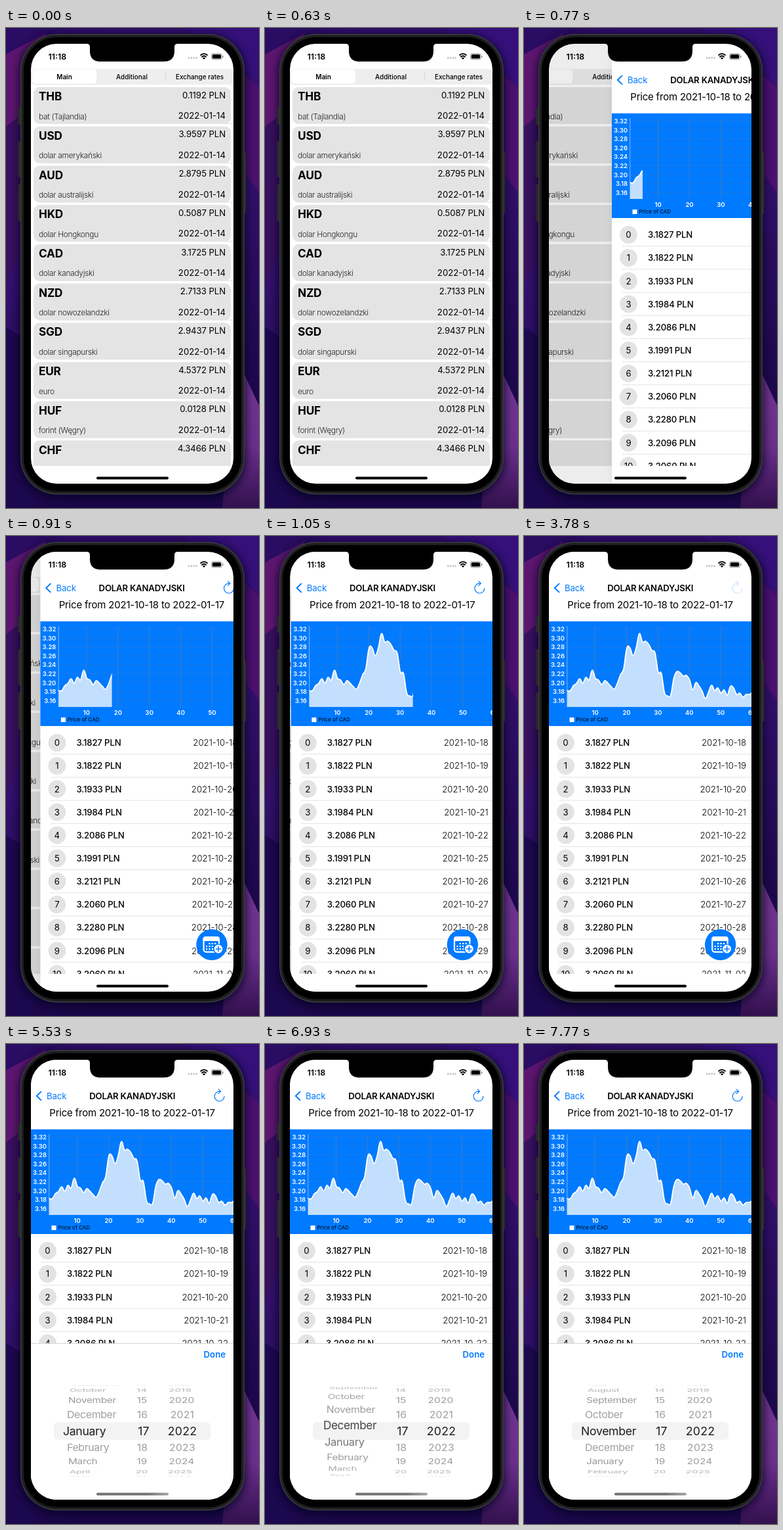
Animation, 386 px wide and 730 px high, one loop 8 s. Source, as an HTML page:

```html
<!DOCTYPE html>
<html lang="pl">
<head>
<meta charset="utf-8">
<title>Exchange rates</title>
<style>
html, body { margin: 0; width: 100%; height: 100%; overflow: hidden; background: #1c0b52; }
svg { display: block; width: 386px; height: 730px; font-family: Inter, Roboto, sans-serif; }
text { white-space: pre; }
</style>
</head>
<body>
<script>
const LOOP = 8000, STEP = 70, BLUE = '#007aff';
const SCREEN = { x: 38, y: 24, w: 309, h: 669 };

// ---- markup helpers ----
const rect = (x, y, w, h, fill, r = 0, extra = '') =>
  `<rect x="${x}" y="${y}" width="${w}" height="${h}" rx="${r}" fill="${fill}" ${extra}/>`;
const text = (s, x, y, size, { weight = 400, fill = '#000', anchor = 'start', gap = 0, id = '' } = {}) =>
  `<text ${id && `id="${id}"`} x="${x}" y="${y}" font-size="${size}" font-weight="${weight}" fill="${fill}" text-anchor="${anchor}" letter-spacing="${gap}">${s}</text>`;
const line = (x1, y1, x2, y2, stroke, w = 1, extra = '') =>
  `<path d="M${x1} ${y1}L${x2} ${y2}" stroke="${stroke}" stroke-width="${w}" ${extra}/>`;
const stroke = (d, color, w) =>
  `<path d="${d}" fill="none" stroke="${color}" stroke-width="${w}" stroke-linecap="round" stroke-linejoin="round"/>`;
const repeat = (n, f) => Array.from({ length: n }, (_, i) => f(i)).join('');
const gradient = (id, stops, dir = 'x2="0" y2="1"') => `<linearGradient id="${id}" x1="0" y1="0" ${dir}>
  ${stops.map(([at, c]) => `<stop offset="${at}" stop-color="${c}"/>`).join('')}</linearGradient>`;

// ---- backdrop and phone ----
const backdrop = () => `
  ${rect(0, 0, 386, 730, 'url(#night)')}
  <path d="M0 0H90L0 40Z" fill="#2a0c62"/>
  <path d="M0 40L60 8V120L0 150Z" fill="#5c1670"/>
  <path d="M0 150L40 118V300L0 390Z" fill="#38105f"/>
  <path d="M0 455L40 480V730H0Z" fill="#1c084e"/>
  <path d="M270 0H386V90L340 40Z" fill="#35107a"/>
  <path d="M386 90V250L350 200V60Z" fill="#4b1070"/>
  <path d="M350 498L386 574V730H330Z" fill="url(#lilac)"/>
  ${rect(18, 8, 350, 708, '#06021a', 60, 'opacity=".6" filter="url(#blur)"')}`;

const phone = () => `
  ${[[121, 26], [172, 55], [238, 56]].map(([y, h]) => rect(18, y, 6, h, '#29292c', 1.5)).join('')}
  ${rect(361, 190, 5.5, 92, '#29292c', 1.5)}
  ${rect(22, 9, 342, 700.5, '#3c3c3f', 56)}
  ${rect(23.5, 10.5, 339, 697.5, '#1e1e20', 54.5)}
  ${rect(27, 14, 332, 690.5, '#000', 51)}`;

const statusBar = () => `
  ${text('11:18', 64.5, 48, 12.4, { weight: 600 })}
  ${repeat(4, i => `<circle cx="${279.3 + i * 3.7}" cy="45.5" r="1.2" fill="#b4b4b6"/>`)}
  ${stroke('M297 41.2Q302 37 307 41.2M299 43.8Q302 41.3 305 43.8', '#000', 1.8)}
  <path d="M299.8 45.6Q302 44.1 304.2 45.6L302 48Z"/>
  ${rect(313.4, 39, 16, 8.8, 'none', 2.6, 'stroke="#8a8a8c" stroke-width=".9"')}
  ${rect(314.7, 40.3, 13.4, 6.2, '#000', 1.6)}
  ${rect(330.4, 42, 1.2, 3, '#8a8a8c', .6)}`;

const notch = () =>
  `<path d="M123 22V24Q128 24 128 29V35Q128 51 144 51H241Q257 51 257 35V29Q257 24 262 24V22Z"/>`;

// ---- list of currencies ----
const RATES = [
  ['THB', 'bat (Tajlandia)', '0.1192'], ['USD', 'dolar amerykański', '3.9597'],
  ['AUD', 'dolar australijski', '2.8795'], ['HKD', 'dolar Hongkongu', '0.5087'],
  ['CAD', 'dolar kanadyjski', '3.1725'], ['NZD', 'dolar nowozelandzki', '2.7133'],
  ['SGD', 'dolar singapurski', '2.9437'], ['EUR', 'euro', '4.5372'],
  ['HUF', 'forint (Węgry)', '0.0128'], ['CHF', 'frank szwajcarski', '4.3466'],
];

const card = ([code, name, price], i) => `<g transform="translate(0 ${90 + i * 59.7})">
  ${line(54, 55.4, 347, 55.4, '#dadada', .8)}
  ${rect(42, 0, 301, 56, '#e4e4e4', 9)}
  ${text(code, 50, 20.3, 17.2, { weight: 700, gap: -.2 })}
  ${text(name, 50, 48.7, 11.9, { weight: 300, fill: '#222', gap: -.3 })}
  ${text(price + ' PLN', 335, 16.8, 13.2, { anchor: 'end', gap: -.1 })}
  ${text('2022-01-14', 335, 48.4, 13.2, { anchor: 'end' })}</g>`;

const listPage = () => `<g id="list">
  ${rect(38, 24, 309, 669, '#fff')}
  ${rect(38, 62.3, 309, 24, '#eeeeef', 6)}
  ${rect(39.5, 63.8, 99, 21.8, '#000', 5.5, 'opacity=".1"')}
  ${rect(39.5, 63, 99, 22, '#fff', 5.5)}
  ${line(243.5, 67.5, 243.5, 80.5, '#cfcfd1', .8)}
  ${[['Main', 89, 600], ['Additional', 192, 500], ['Exchange rates', 295.5, 500]]
    .map(([s, x, weight]) => text(s, x, 77.8, 9.95, { weight, anchor: 'middle' })).join('')}
  <g clip-path="url(#body)">${RATES.map(card).join('')}</g></g>`;

// ---- chart ----
const STEP_X = 4.79, X0 = 65.8, FLOOR = 260;
const VALUES = [3.1827, 3.1822, 3.1933, 3.1984, 3.2086, 3.1991, 3.2121, 3.206, 3.228, 3.2096, 3.206];
const priceY = v => 141.5 + (3.32 - v) * 680;
// the rest of the curve as heights on the chart
const TAIL = [226, 220, 224, 229, 233, 224, 211, 202, 171, 170, 182, 170, 148.5, 161, 160, 165,
  174, 178, 207, 209, 238, 243, 242, 216, 206, 208, 213, 212, 219, 234, 223, 228, 236, 247, 238,
  227, 235, 231, 239, 234, 242, 229, 231, 241, 239, 245, 241, 241, 239, 241, 240, 238];
const POINTS = [...VALUES.map(priceY), ...TAIL].map((y, i) => [X0 + i * STEP_X, y]);

function curve(p) {
  const at = i => p[Math.max(0, Math.min(p.length - 1, i))];
  const lean = (a, b, o, k) => [o[0] + (b[0] - a[0]) * k, o[1] + (b[1] - a[1]) * k];
  let d = `M${p[0]}`;
  for (let i = 1; i < p.length; i++) {
    d += `C${lean(at(i - 2), at(i), at(i - 1), .2)} ${lean(at(i - 1), at(i + 1), at(i), -.2)} ${at(i)}`;
  }
  return d;
}

function chart() {
  const d = curve(POINTS), bold = { weight: 600, fill: '#fff' };
  const tick = i => 108.6 + i * 47.9, level = i => 141.5 + i * 13.6;
  return `${rect(38, 129.8, 309, 159.2, BLUE)}<g clip-path="url(#page)">
  ${repeat(9, i => line(X0, level(i), 347, level(i), '#5c7ea8', .7, 'opacity=".45"'))}
  ${repeat(6, i => line(tick(i), 137, tick(i), FLOOR, '#5c7ea8', 1, 'opacity=".7"'))}
  <g clip-path="url(#reveal)">
    <path d="${d}V${FLOOR}H${X0}Z" fill="#fff" opacity=".76"/>
    ${stroke(d, '#fff', 1.8)}
  </g>
  ${line(X0, 137, X0, FLOOR, '#9cc4f0', .8)}
  ${repeat(9, i => text((3.32 - i * .02).toFixed(2), 62, level(i) + 3.5, 9.5, { ...bold, anchor: 'end' }))}
  ${repeat(6, i => text(10 * (i + 1), tick(i), 272.3, 9.5, { ...bold, anchor: 'middle' }))}
  ${rect(69.5, 276, 7, 7, '#fff')}
  ${text('Price of CAD', 79.5, 282.3, 8)}</g>`;
}

// ---- detail page ----
const DATES = ['10-18', '10-19', '10-20', '10-21', '10-22', '10-25', '10-26', '10-27', '10-28', '10-29', '11-02'];

const row = (v, i) => `<g transform="translate(0 ${314.4 + i * 35.15})">
  <circle cx="63.5" cy="0" r="13.4" fill="#e3e3e4"/>
  ${text(i, 63.5, 4.8, 13.2, { anchor: 'middle' })}
  ${text(v.toFixed(4) + ' PLN', 93, 4.8, 13.2, { weight: 500, gap: -.15 })}
  ${text('2021-' + DATES[i], 339, 4.8, 13.2, { weight: 300, anchor: 'end' })}
  ${line(53.5, 17.4, 347, 17.4, '#dcdcde', .8)}</g>`;

const addButton = () => `
  <circle cx="299.6" cy="621.6" r="23.7" fill="${BLUE}"/>
  <g id="icon">
    ${rect(287.2, 610.2, 23.4, 22.4, 'none', 3.6, 'stroke="#fff" stroke-width="2.2"')}
    <path d="M286.2 616V613Q286.2 609 290.2 609H307.6Q311.6 609 311.6 613V616Z" fill="#fff"/>
    ${repeat(11, i => {
      const n = i + 1;
      return rect(290.6 + n % 4 * 4.4, 618.8 + (n >> 2) * 4.1, 2.2, 2.2, '#fff', .5);
    })}
    <circle cx="309.6" cy="628" r="7.8" fill="${BLUE}"/>
    <circle cx="309.6" cy="628" r="6.4" fill="#fff"/>
    ${stroke('M306 628H313.2M309.6 624.4V631.6', BLUE, 1.6)}
  </g>`;

const detailPage = () => `<g id="detail">
  ${rect(38, 24, 309, 669, '#000', 0, 'opacity=".06" filter="url(#blur)"')}
  ${rect(38, 24, 309, 669, '#fff')}
  ${stroke('M53.4 72.6L46.8 79L53.4 85.4', BLUE, 2)}
  ${text('Back', 62, 83.7, 13.2, { fill: BLUE, gap: -.1 })}
  ${text('DOLAR KANADYJSKI', 192.7, 83.7, 13.2, { weight: 600, anchor: 'middle', gap: -.2 })}
  <g id="refresh">${stroke('M333 79.6A7.4 7.4 0 1 1 325.6 72.2H327.4M324.2 68.8L327.6 72.2L324.2 75.6', BLUE, 1.2)}</g>
  ${text('Price from 2021-10-18 to 2022-01-17', 192.5, 110.4, 15, { anchor: 'middle', gap: -.2 })}
  ${chart()}
  <g clip-path="url(#body)">${VALUES.map(row).join('')}</g>
  ${addButton()}</g>`;

// ---- date wheel ----
const MONTHS = ['January', 'February', 'March', 'April', 'May', 'June', 'July',
  'August', 'September', 'October', 'November', 'December'];
const MID = 588.6, RADIUS = 69, TURN = 21.2 * Math.PI / 180;
const SCALE = [1, .895, .87, .85, .84], SHADE = [.88, .38, .4, .3, .16];
const COLUMNS = [
  { anchor: 'start', gap: -.35, x: [87, 93, 95, 97, 99], label: n => MONTHS[(n + 24) % 12] },
  { anchor: 'middle', gap: .1, x: [210, 208, 207.5, 207, 206], label: n => 17 + n },
  { anchor: 'middle', gap: .2, x: [269, 269, 268, 265.5, 264], label: n => 2022 + n },
];
const SLOTS = 9;

const sheet = () => `<g id="sheet">
  ${rect(38, 455, 309, 238, '#fff')}
  ${line(38, 455.5, 347, 455.5, '#d2d2d4', .9)}
  ${text('Done', 335, 477.4, 13.2, { weight: 600, fill: BLUE, anchor: 'end' })}
  ${rect(73, 575, 239, 27, '#f3f3f4', 6)}
  ${COLUMNS.map((c, k) => repeat(SLOTS, i => text('', 0, 6.4, 17.7, { ...c, id: `w${k}-${i}` }))).join('')}</g>`;

document.body.innerHTML = `<svg viewBox="0 0 386 730"><defs>
  ${gradient('night', [[0, '#300d6c'], [.5, '#33106c'], [1, '#1a0748']], 'x2=".25" y2="1"')}
  ${gradient('lilac', [[.1, '#70358f'], [.6, '#6a2f8c'], [1, '#32104e']])}
  ${gradient('bar', [[.7, '#717173'], [1, '#a4a4a6']], 'x2="1" y2="0"')}
  <filter id="blur"><feGaussianBlur stdDeviation="6"/></filter>
  <clipPath id="screen">${rect(SCREEN.x, SCREEN.y, SCREEN.w, SCREEN.h, '#000', 39)}</clipPath>
  <clipPath id="page">${rect(38, 24, 309, 669, '#000')}</clipPath>
  <clipPath id="body">${rect(38, 87, 309, 579, '#000')}</clipPath>
  <clipPath id="reveal"><rect id="cover" x="64.8" y="130" width="0" height="130"/></clipPath>
</defs>
${backdrop()}${phone()}
<g clip-path="url(#screen)">${listPage()}${rect(38, 24, 309, 669, '#000', 0, 'id="dim"')}${detailPage()}${sheet()}
  ${statusBar()}${rect(138, 682.6, 110, 3.8, '#000', 1.9, 'id="home"')}</g>
${notch()}</svg>`;

// ---- motion ----
const $ = id => document.getElementById(id);
const clamp = v => Math.max(0, Math.min(1, v));
const span = (t, a, b) => clamp((t - a) / (b - a));
const easeOut = p => 1 - (1 - p) ** 2.2;
const easeSine = p => (1 - Math.cos(Math.PI * p)) / 2;
const easeInOut = p => p * p * (3 - 2 * p);

function pick(table, r) {
  const i = Math.min(table.length - 2, Math.floor(r));
  return table[i] + (table[i + 1] - table[i]) * Math.min(1, r - i);
}

// critically damped spring: share of the way still to go
function slideLeft(t) {
  const s = Math.max(0, t - 632.9) * .01743;
  const left = (1 + s) * Math.exp(-s);
  return left < .0015 ? 0 : left;
}

function turnWheel(column, k, pos) {
  const base = Math.round(pos);
  for (let i = 0; i < SLOTS; i++) {
    const n = base + i - 4, r = n - pos, a = Math.abs(r), el = $(`w${k}-${i}`);
    const angle = r * TURN, s = pick(SCALE, a), flat = Math.max(0, Math.cos(angle));
    el.textContent = column.label(n);
    el.setAttribute('transform',
      `translate(${pick(column.x, a)} ${MID + RADIUS * Math.sin(angle)}) scale(${s} ${s * flat})`);
    el.setAttribute('opacity', a > 4.24 ? 0 : pick(SHADE, a));
  }
}

function draw(t) {
  const left = slideLeft(t), gone = 1 - left;
  $('list').setAttribute('transform', `translate(${-.3 * SCREEN.w * gone} 0)`);
  $('dim').setAttribute('opacity', .1 * gone);
  $('detail').setAttribute('transform', `translate(${SCREEN.w * left} 0)`);
  $('detail').style.display = left < 1 ? '' : 'none';

  const shown = Math.round(easeSine(span(t, 640, 1420)) * (POINTS.length - 1));
  $('cover').setAttribute('width', shown ? shown * STEP_X + 1 : 0);

  $('refresh').setAttribute('opacity', t < 3780 ? 1 : .2 + .8 * easeInOut(span(t, 3810, 4340)));
  $('icon').setAttribute('opacity', t >= 5320 ? .85 : 1);

  $('sheet').style.display = t >= 5460 ? '' : 'none';
  $('home').setAttribute('fill', t >= 5530 ? 'url(#bar)' : '#000');
  const month = -easeOut(span(t, 6790, 7140)) - easeOut(span(t, 7490, 7770));
  COLUMNS.forEach((c, k) => turnWheel(c, k, k ? 0 : month));
}

const start = performance.now();
function tick() {
  const t = (performance.now() - start) % LOOP;
  draw(Math.floor(t / STEP) * STEP);
  requestAnimationFrame(tick);
}
draw(0);
requestAnimationFrame(tick);
</script>
</body>
</html>
```
